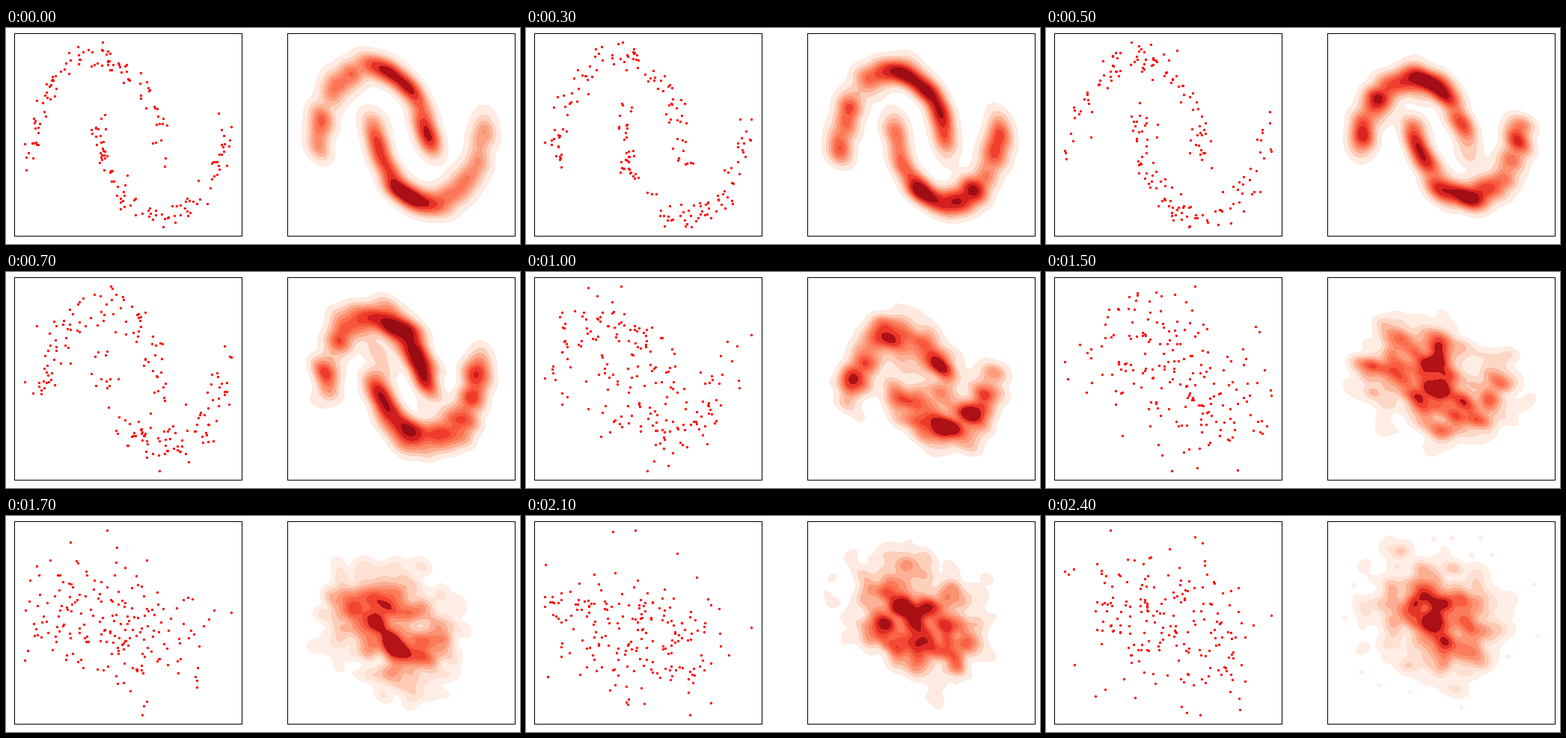
A matplotlib script that plays this animation: 687x289 px, repeating every 2.5 s.

```python
import numpy as np
import matplotlib.pyplot as plt
from matplotlib.animation import FuncAnimation

W, H, DPI = 687, 289, 100
FRAMES, INTERVAL = 25, 100
DOTS, SAMPLES = 200, 500    # points shown, points behind the density
GRID = 150                  # density grid resolution
BW_ADJUST, CUT = 0.5, 3

plt.rcParams["axes.linewidth"] = 72 / DPI

fig = plt.figure(figsize=(W / DPI, H / DPI), dpi=DPI, facecolor="white")


def panel(left):
    return fig.add_axes([left / W, 11 / H, 304 / W, 271 / H])


scatter_ax, density_ax = panel(11), panel(376)


def moons(rng, n):
    """Two interleaving half circles with a little jitter."""
    a = rng.uniform(0, np.pi, n)
    upper = np.arange(n) < n // 2
    x = np.where(upper, np.cos(a), 1 - np.cos(a))
    y = np.where(upper, np.sin(a), 0.5 - np.sin(a))
    return np.stack([x, y]) + rng.normal(0, 0.05, (2, n))


def diffuse(rng, n, i):
    """Fresh sample of the moons after i steps of a sigmoid noise schedule."""
    keep = np.exp(-np.log1p(np.exp(0.37 * i - 4.6)) / 10)
    noise = rng.normal(size=(2, n))
    return np.sqrt(keep) * moons(rng, n) + np.sqrt(1 - keep) * noise


def kde(pts):
    """Gaussian density of pts on a grid reaching CUT bandwidths past them."""
    cov = np.cov(pts) * (BW_ADJUST * pts.shape[1] ** (-1 / 6)) ** 2
    pad = CUT * np.sqrt(np.diag(cov))
    lo, hi = pts.min(axis=1) - pad, pts.max(axis=1) + pad
    xs, ys = (np.linspace(a, b, GRID) for a, b in zip(lo, hi))
    grid = np.stack([g.ravel() for g in np.meshgrid(xs, ys)])
    white = np.linalg.inv(np.linalg.cholesky(cov))
    g, p = white @ grid, white @ pts
    d2 = (g ** 2).sum(0)[:, None] + (p ** 2).sum(0) - 2 * g.T @ p
    return xs, ys, np.exp(-d2 / 2).sum(axis=1).reshape(GRID, GRID)


def mass_levels(z, count=10, thresh=0.05):
    """Density values that leave evenly spaced shares of the mass outside."""
    v = np.sort(z.ravel())[::-1]
    cdf = np.cumsum(v) / v.sum()
    idx = np.searchsorted(cdf, 1 - np.linspace(thresh, 1, count))
    return v[idx]


def update(i):
    rng = np.random.default_rng(100 + i)
    for ax in (scatter_ax, density_ax):
        ax.cla()
        ax.set(xticks=[], yticks=[])

    scatter_ax.plot(*diffuse(rng, DOTS, i), "o", color="red", ms=2.4, mew=0)

    xs, ys, z = kde(diffuse(rng, SAMPLES, i))
    density_ax.contourf(xs, ys, z, levels=mass_levels(z), cmap="Reds")
    density_ax.set(xlim=(xs[0], xs[-1]), ylim=(ys[0], ys[-1]))
    return []


anim = FuncAnimation(fig, update, frames=FRAMES, interval=INTERVAL,
                     init_func=lambda: [], repeat=True, repeat_delay=0)
plt.show()
```
